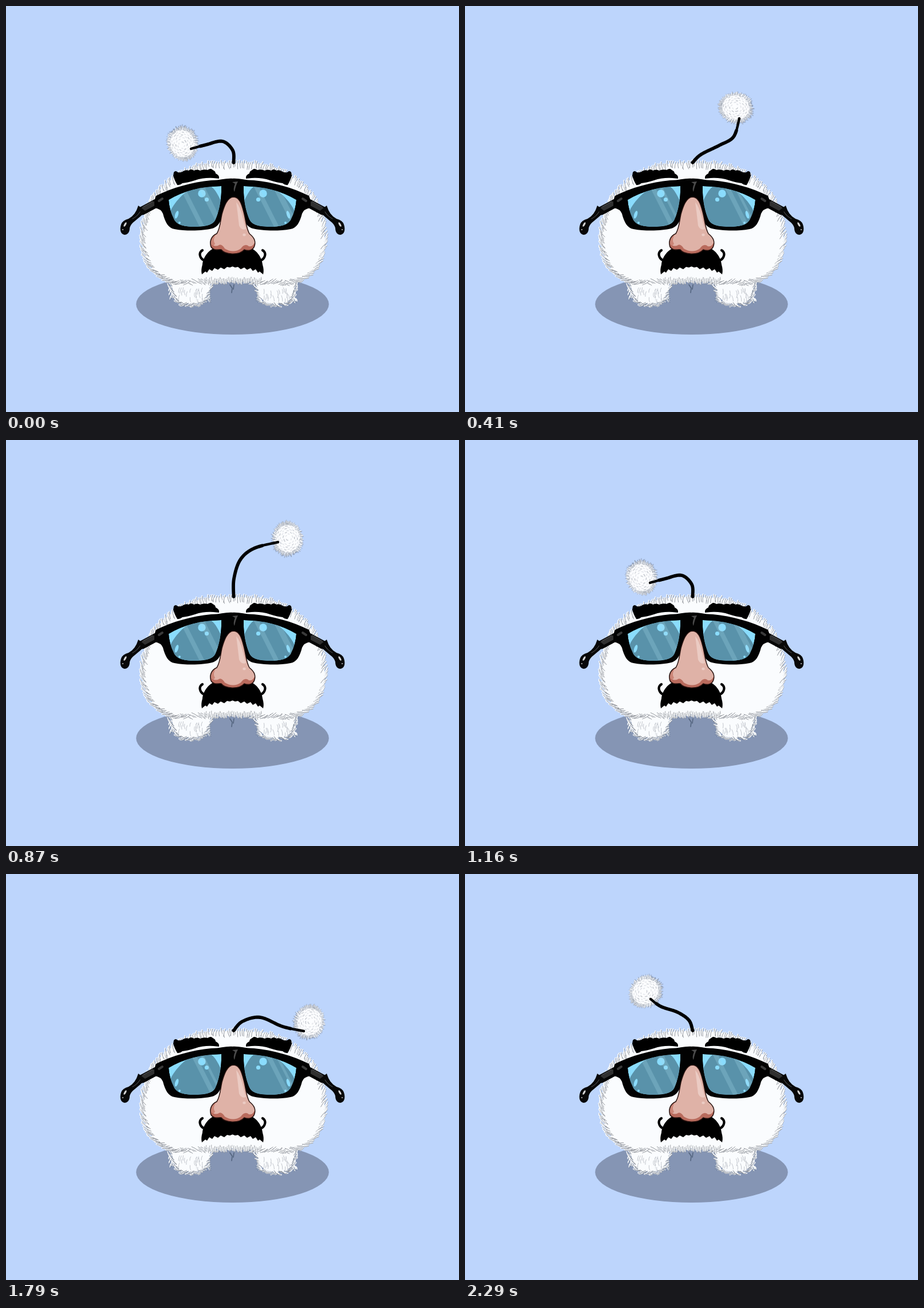
These frames come from a looping animation (791x708 px, 2330 ms). An HTML page with a canvas:

```html
<!DOCTYPE html>
<html lang="en">
<head>
<meta charset="utf-8">
<title>Fluffy creature in disguise</title>
<style>
html, body { margin: 0; width: 100%; height: 100%; overflow: hidden; background: #bdd5fc; }
canvas { display: block; }
</style>
</head>
<body>
<canvas id="stage" width="791" height="708"></canvas>
<script>
const W = 791, H = 708, LOOP = 2330, FPS = 24, CYCLE = 28;
const ctx = document.getElementById('stage').getContext('2d');

let seed = 7;
const rnd = () => (seed = (seed * 16807) % 2147483647) / 2147483647;
const vary = (a, b) => a + rnd() * (b - a);

function layer(w, h) {
  const canvas = document.createElement('canvas');
  canvas.width = w;
  canvas.height = h;
  return canvas.getContext('2d');
}

function fill(c, path, color) {
  c.fillStyle = color;
  c.fill(path);
}

function line(c, path, color, width) {
  c.strokeStyle = color;
  c.lineWidth = width;
  c.lineCap = c.lineJoin = 'round';
  c.stroke(path);
}

function ellipse(x, y, rx, ry = rx, turn = 0) {
  const p = new Path2D();
  p.ellipse(x, y, rx, ry, turn, 0, Math.PI * 2);
  return p;
}

function mirrored(c, axis, draw) {
  draw(c);
  c.save();
  c.translate(axis * 2, 0);
  c.scale(-1, 1);
  draw(c);
  c.restore();
}

const between = (a, b, c, d, t) => b + 0.5 * t * (c - a +
  t * (2 * a - 5 * b + 4 * c - d + t * (3 * (b - c) + d - a)));

// Dense samples of a smooth curve through a few points
function smoothCurve(points, steps, closed) {
  const n = points.length, out = [];
  const at = i => points[closed ? (i + n) % n : Math.max(0, Math.min(n - 1, i))];
  for (let i = 0; i < (closed ? n : n - 1); i++) {
    const [a, b, c, d] = [-1, 0, 1, 2].map(k => at(i + k));
    for (let s = 0; s < steps; s++) {
      out.push([0, 1].map(k => between(a[k], b[k], c[k], d[k], s / steps)));
    }
  }
  if (!closed) out.push(points[n - 1]);
  return out;
}

function polyline(points) {
  const p = new Path2D();
  points.forEach(([x, y]) => p.lineTo(x, y));
  return p;
}

function hair(c, x, y, dx, dy, len, color, bend = 1.2) {
  const curve = size => {
    const p = new Path2D(), l = len * size;
    p.moveTo(x, y);
    p.quadraticCurveTo(x + dx * l / 2 - dy * bend, y + dy * l / 2 + dx * bend, x + dx * l, y + dy * l);
    return p;
  };
  line(c, curve(0.8), '#fafcfe', 2.2);
  c.translate(0.8, 0.4);
  line(c, curve(1), color, 0.8);
  c.translate(-0.8, -0.4);
}

// Hairs lie along the outline, flowing from the top down
function fur(c, points, len, color) {
  const n = points.length;
  points.forEach(([x, y], i) => {
    const [ax, ay] = points[(i + n - 1) % n], [bx, by] = points[(i + 1) % n];
    const d = Math.hypot(bx - ax, by - ay) || 1;
    const tx = (bx - ax) / d, ty = (by - ay) / d;
    const nx = -ty, ny = tx;
    const flow = (ty < 0 ? -1 : 1) * (1 - Math.max(0, ny)) * 0.9;
    const dx = tx * flow + nx * 0.55 + vary(-0.15, 0.15);
    const dy = ty * flow + ny * 0.55 + vary(-0.15, 0.15);
    const m = Math.hypot(dx, dy) || 1, inset = vary(1, 6);
    hair(c, x - nx * inset, y - ny * inset, dx / m, dy / m, vary(len * 0.8, len * 1.15), color);
  });
}

const lens = new Path2D('M284 338C310 322 340 315 376 314C377 335 372 360 365 374C360 383 345 385 325 385C305 384 297 380 293 371Q285 355 284 338Z');

function drawLeg(c) {
  const edge = smoothCurve([[353, 476], [351, 502], [341, 516], [320, 519], [301, 515], [293, 500], [293, 476]].reverse().reverse(), 10, true);
  for (let i = 0; i < 26; i++) {
    const left = i % 2, x = left ? vary(286, 294) : vary(348, 355);
    hair(c, x, vary(484, 514), left ? -0.4 : 0.4, 0.9, 6, '#526581');
  }
  fill(c, polyline(edge), '#fafcfe');
  fur(c, edge, 7, '#686f7b');
  for (let i = 0; i < 24; i++) hair(c, vary(300, 344), vary(490, 512), vary(-0.3, 0.3), 1, vary(6, 10), '#b4b8bf');
}

function drawBody(c) {
  const half = [[340, 278], [297, 297], [264, 326], [245, 363], [238, 405], [245, 440], [264, 466], [298, 481], [347, 480]];
  const right = half.map(([x, y]) => [794 - x, y]).reverse();
  const edge = smoothCurve([[397, 274], ...half, [397, 478], ...right].reverse(), 16, true);
  fill(c, polyline(edge), '#fafcfe');
  fur(c, edge, 12, '#7a7e86');
  for (let x = 346; x < 448; x += 3) hair(c, x, vary(472, 477), vary(-0.15, 0.15), 1, 10, '#8f9297');
}

function drawGlassesHalf(c) {
  // Temple arm
  line(c, new Path2D('M266 342L238 357'), '#050505', 15);
  line(c, new Path2D('M257 345L240 354'), '#303030', 8);
  line(c, new Path2D('M256 341L240 350'), '#4b4b4b', 1.2);
  fill(c, new Path2D('M231 348L244 358Q234 368 225 375Q218 380 216 387C216 395 212 399 207 399C200 398 198 390 201 381Q203 374 214 371Q226 365 231 348Z'), '#080808');
  line(c, new Path2D('M234 359Q229 367 221 371'), '#454545', 1.2);
  fill(c, ellipse(208, 381, 1.7, 4.2, 0.5), '#d4d4d4');
  fill(c, ellipse(204, 390, 1), '#cccccc');
  // Rim
  fill(c, new Path2D('M396 301C384 300 375 304 358 304C325 307 290 317 262 331Q257 342 260 352Q271 354 274 362C278 377 283 387 294 389C315 393 345 392 360 388C367 386 371 382 375 374L396 374Z'), '#020202');
  line(c, new Path2D('M267 340L273 336'), '#3a3a3a', 4);
  // Lens
  c.save();
  c.clip(lens);
  fill(c, lens, '#8adcfd');
  fill(c, new Path2D('M283 366C293 341 315 318 340 312C352 310 360 314 366 323Q372 332 378 346V390H283Z'), '#5992aa');
  fill(c, ellipse(342, 327, 6.7), '#8adcfd');
  fill(c, ellipse(350.5, 337.5, 3.6), '#8adcfd');
  fill(c, ellipse(298, 364, 2.8, 7, 0.3), '#8adcfd');
  fill(c, ellipse(303, 378, 2), '#8adcfd');
  c.restore();
}

function drawBrow(c) {
  fill(c, new Path2D('M293 290Q296 286 300 290Q304 291 308 289Q313 285 319 287Q323 283 328 287Q334 284 339 287Q346 284 352 286Q358 282 361 286Q366 288 366 292Q373 295 372 301L362 300Q345 299 330 304Q318 308 308 309Q304 313 299 312Q294 303 292 296Z'), '#000');
}

function drawNose(c) {
  const nose = new Path2D('M397 333C386 334 381 349 377 363C374 377 374 388 368 397C358 401 355 411 358 420C363 428 371 424 376 425C382 434 408 435 416 425C423 428 432 426 434 418C437 408 431 402 425 397C419 386 419 374 415 359C411 343 407 333 397 333Z');
  fill(c, nose, '#dfb2a7');
  c.save();
  c.clip(nose);
  fill(c, new Path2D('M354 405Q358 421 370 418Q376 413 382 423Q397 432 410 423Q417 413 424 419Q433 421 436 406V440H354Z'), '#b96b5d');
  fill(c, new Path2D('M367 398Q360 407 365 415Q361 420 357 414L358 402Z'), '#cb8577');
  fill(c, new Path2D('M402 342C412 354 414 374 419 389Q411 392 407 383Q405 364 402 342Z'), '#ebcbc3');
  fill(c, ellipse(416, 399, 2.7, 2.3), '#ebcbc3');
  c.restore();
  line(c, nose, '#25100d', 1.5);
}

function drawMoustacheHalf(c) {
  fill(c, new Path2D('M396 432C386 431 379 422 368 421C355 423 344 438 343 451Q340 461 342 468L348 463L351 465L355 459L360 462L364 457L370 460L375 456L381 459L386 455L391 456L396 454Z'), '#000');
  line(c, new Path2D('M355 445C345 446 339 440 338.5 433Q339 428 343 426'), '#000', 4.2);
}

function buildScene() {
  const c = layer(W, H);
  c.fillStyle = '#bdd5fc';
  c.fillRect(0, 0, W, H);
  fill(c, ellipse(395.5, 520, 168.3, 53), '#8595b4');
  line(c, new Path2D('M391 486L395 492L394 500M398 486L397 494'), '#53647e', 1.6);
  mirrored(c, 397, drawLeg);
  drawBody(c);
  mirrored(c, 395.5, drawBrow);
  mirrored(c, 395.5, drawGlassesHalf);
  fill(c, new Path2D('M395 307L405 306Q401 313 399 324Q396 320 400 310Z'), '#4b4b4b');
  mirrored(c, 395.5, drawMoustacheHalf);
  drawNose(c);
  return c.canvas;
}

function buildPom() {
  const c = layer(80, 80);
  c.translate(40, 40);
  c.scale(1.04, 0.92);
  for (let i = 0; i < 130; i++) {
    const a = i * 2.4, r = vary(18, 22);
    hair(c, Math.cos(a) * r, Math.sin(a) * r, Math.cos(a + 0.3), Math.sin(a + 0.3), vary(7, 11), '#717c8f', 1);
  }
  fill(c, ellipse(0, 0, 23), '#fcfdff');
  for (let i = 0; i < 75; i++) {
    const a = i * 2.4, r = 3 + Math.sqrt(i / 75) * 22, p = new Path2D();
    p.arc(0, 0, r, a, a + vary(2, 4.5) / r);
    line(c, p, i % 3 ? '#bdc1c8' : '#858c98', 0.8);
  }
  return c.canvas;
}

// frame, three stalk points, tip, pompom centre, pompom angle in degrees
const swing = [
  [0, 396, 252, 378, 236, 349, 242, 323, 249, 308, 240, 165],
  [3, 403, 248, 392, 228, 366, 232, 335, 250, 319, 244, 170],
  [6, 413, 252, 424, 225, 416, 200, 396, 185, 378, 178, 200],
  [10, 412, 259, 444, 243, 469, 228, 479, 196, 473, 177, 280],
  [15, 413, 257, 444, 250, 483, 266, 520, 274, 530, 258, 375],
  [18, 401, 248, 424, 224, 466, 220, 517, 237, 536, 226, 372],
  [21, 398, 242, 409, 209, 433, 189, 475, 178, 492, 172, 355],
  [24, 393, 250, 394, 221, 404, 195, 413, 171, 418, 153, 300],
  [27, 391, 255, 371, 241, 342, 231, 324, 218, 315, 205, 232]
];

function swingKey(i) {
  const n = swing.length, turn = Math.floor(i / n);
  const [time, ...values] = swing[i - turn * n];
  return { time: time + turn * CYCLE, values };
}

function poseAt(frame) {
  let i = swing.length - 1;
  while (swing[i][0] > frame) i--;
  const [a, b, c, d] = [i - 1, i, i + 1, i + 2].map(swingKey);
  const span = c.time - b.time, t = (frame - b.time) / span;
  return b.values.map((from, k) => {
    const to = c.values[k];
    const m0 = (to - a.values[k]) / (c.time - a.time) * span;
    const m1 = (d.values[k] - from) / (d.time - b.time) * span;
    return from + t * (m0 + t * (3 * (to - from) - 2 * m0 - m1 + t * (2 * (from - to) + m0 + m1)));
  });
}

const smooth = (a, b, x) => {
  const t = Math.max(0, Math.min(1, (x - a) / (b - a)));
  return t * t * (3 - 2 * t);
};

function drawStreaks(frame) {
  const k = smooth(2, 10, frame) - smooth(15, 21, frame);
  const bands = [[301 + 20 * k, 9], [334 + 4 * k, 11 - 6 * k]];
  mirrored(ctx, 395.5, c => {
    const flipped = c.getTransform().a < 0;
    c.save();
    c.clip(lens);
    if (flipped) c.transform(-1, 0, 0, 1, 661, 0);
    for (const [x, width] of bands) {
      fill(c, polyline([[x, 312], [x + width, 312], [x + width + 38, 387], [x + 38, 387]]), 'rgba(165,213,230,0.25)');
    }
    c.restore();
  });
}

const scene = buildScene(), pom = buildPom();

function drawAntenna(frame) {
  const pose = poseAt(frame);
  const [px, py, angle] = pose.slice(8);
  ctx.save();
  ctx.translate(px, py);
  ctx.rotate((angle - 270) * Math.PI / 180);
  ctx.drawImage(pom, -40, -40);
  ctx.restore();
  const points = [0, 2, 4, 6].map(k => [pose[k], pose[k + 1]]);
  const stalk = smoothCurve([[397.5, 273], ...points], 12);
  line(ctx, polyline(stalk.slice(0, -8)), '#000', 5.8);
  line(ctx, polyline(stalk), '#000', 4.4);
}

function render(now) {
  const frame = Math.floor((now % LOOP + 9) * FPS / 1000) % CYCLE;
  ctx.drawImage(scene, 0, 0);
  drawStreaks(frame);
  drawAntenna(frame);
  requestAnimationFrame(tick);
}

const start = performance.now();
function tick() {
  render(performance.now() - start);
}
render(0);
</script>
</body>
</html>
```
